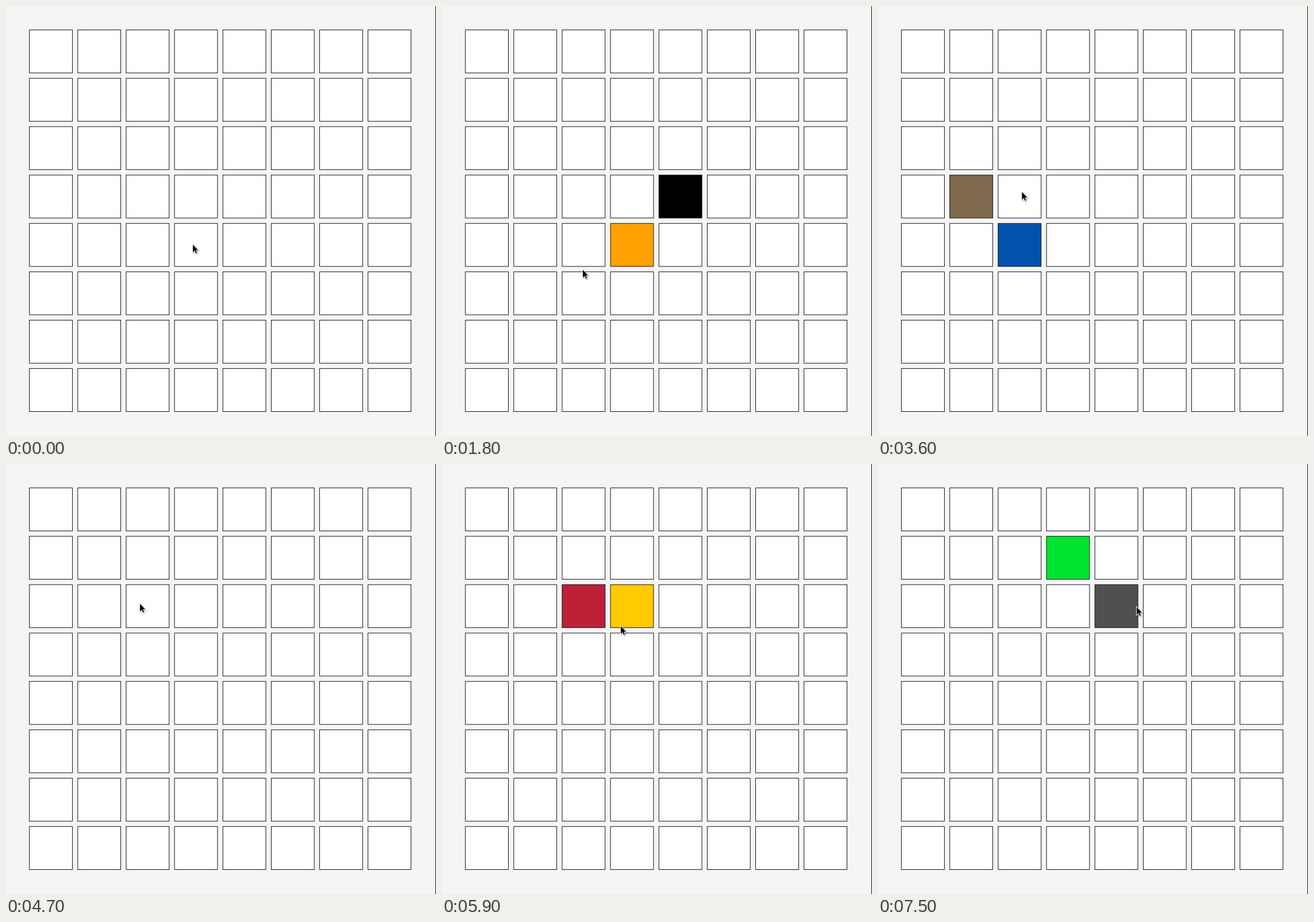
These frames come from a looping animation (748 px wide and 748 px high, 8000 ms). An HTML page with a canvas:

```html
<!DOCTYPE html>
<html lang="en">
<head>
<meta charset="utf-8">
<title>Memory grid</title>
<style>
  html, body { margin: 0; height: 100%; overflow: hidden; background: #f5f5f5; }
  canvas { display: block; }
</style>
</head>
<body>
<canvas width="748" height="748"></canvas>
<script>
const ctx = document.querySelector('canvas').getContext('2d');
const LOOP = 8000, STEP = 100;
const SCALE = 748 / 800;                 // the board is laid out on 800 units
const LEFT = 43, TOP = 44, PITCH = 90, SIZE = 81;
const SPEED = 0.38;                      // pointer, px per ms
const SHOW = 1000;                       // a pair stays open this long

// pointer stops: arrival time, x, y, colour of the card clicked there
const stops = [
  [400, 325, 415, '#ffa100'],
  [900, 398, 346, '#000000'],
  [1200, 322, 491],
  [1800, 245, 459],
  [2100, 242, 424],
  [2400, 231, 404, '#0052ac'],
  [2800, 176, 348],
  [3100, 176, 348, '#7f6a4f'],
  [3600, 250.5, 323.5],
  [3900, 243, 356],
  [4700, 233, 243],
  [4800, 233, 243, '#be2137'],
  [5200, 320, 276],
  [5400, 311, 276, '#ffcb00'],
  [5900, 311, 282],
  [6800, 321, 195, '#00e430'],
  [7500, 450, 249, '#505050']
];

// every click opens the card under the pointer; two clicks make a pair
const clicks = stops.filter(stop => stop[3]);
const cards = clicks.map(([from, x, y, color], i) => ({
  col: Math.floor((x / SCALE - LEFT) / PITCH),
  row: Math.floor((y / SCALE - TOP) / PITCH),
  color, from,
  to: clicks[i | 1][0] + SHOW
}));

const arrow = new Path2D('M0 0V13.4L3.1 10.5L5.3 15.4L7.1 14.6L5 9.8H9.2Z');

function pointerAt(t) {
  const next = stops.findIndex(stop => stop[0] > t);
  if (next < 1) return (next ? stops.at(-1) : stops[0]).slice(1, 3);
  const [t0, x0, y0] = stops[next - 1];
  const [t1, x1, y1] = stops[next];
  const time = Math.min(t1 - t0, Math.hypot(x1 - x0, y1 - y0) / SPEED);
  const k = time ? Math.max(0, 1 - (t1 - t) / time) : 0;
  return [x0 + (x1 - x0) * k, y0 + (y1 - y0) * k];
}

function drawCell(col, row, color) {
  const box = [LEFT + PITCH * col + 0.5, TOP + PITCH * row + 0.5, SIZE - 1, SIZE - 1];
  ctx.fillStyle = color;
  ctx.fillRect(...box);
  ctx.strokeRect(...box);
}

function drawPointer(x, y) {
  ctx.save();
  ctx.translate(x, y);
  ctx.lineWidth = 1.8;
  ctx.strokeStyle = '#fff';
  ctx.shadowColor = 'rgba(0, 0, 0, 0.4)';
  ctx.shadowBlur = 2;
  ctx.shadowOffsetX = ctx.shadowOffsetY = 1;
  ctx.stroke(arrow);
  ctx.shadowColor = 'transparent';
  ctx.fillStyle = '#000';
  ctx.fill(arrow);
  ctx.restore();
}

function draw(t) {
  ctx.fillStyle = '#f5f5f5';
  ctx.fillRect(0, 0, 748, 748);
  ctx.save();
  ctx.scale(SCALE, SCALE);
  ctx.fillStyle = '#000';
  ctx.fillRect(799, 0, 1, 800);
  const open = cards.filter(card => t >= card.from && t < card.to);
  for (let row = 0; row < 8; row++)
    for (let col = 0; col < 8; col++) {
      const card = open.find(c => c.col === col && c.row === row);
      drawCell(col, row, card ? card.color : '#fff');
    }
  ctx.restore();
  drawPointer(...pointerAt(t));
}

const begin = performance.now();
function frame() {
  const t = (performance.now() - begin) % LOOP;
  draw(Math.floor(t / STEP) * STEP);
  requestAnimationFrame(frame);
}
frame();
</script>
</body>
</html>
```
